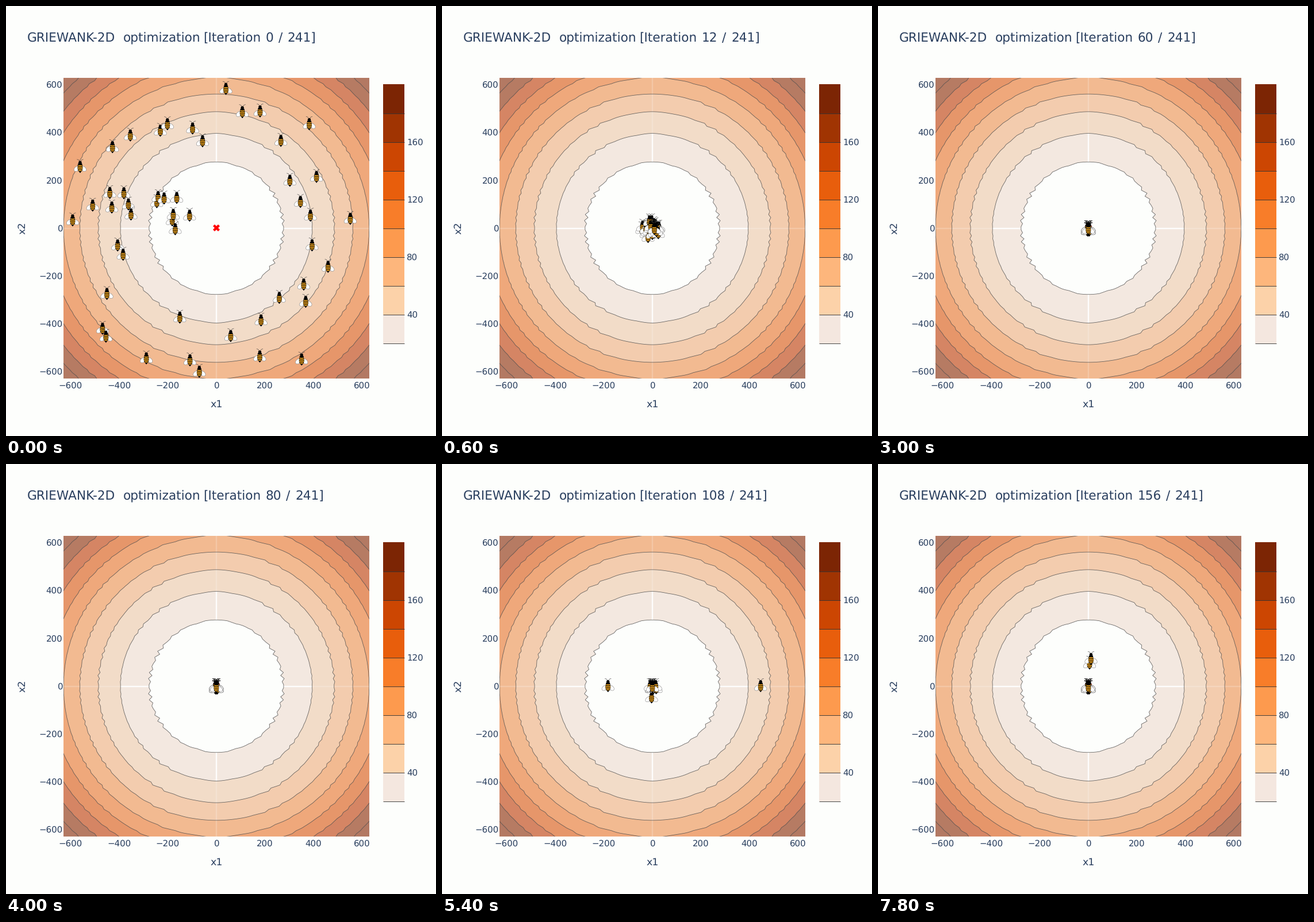
Animation of 748x748 px, one loop 8000 ms. Source, as a matplotlib script:

```python
import numpy as np
import matplotlib.pyplot as plt
from matplotlib.animation import FuncAnimation
from matplotlib.collections import LineCollection
from matplotlib.patches import Rectangle

SIZE, DPI = 748, 68
FRAMES, INTERVAL, STEP, TOTAL = 40, 200, 4, 241
CX, CY = 365.9, 386.5             # pixel position of (0, 0)
SX, SY = 0.42246, 0.41557         # pixels per data unit
LIMIT = 630
COUNT = 50
BACK, INK = "#fdfefc", "#2a3f5f"
TICK, LABEL, TITLE = 14.96, 17.45, 21.6
NUMBER_X = 451.6

BANDS = [BACK, "#f3e8e0", "#f2dcc8", "#f3ccae", "#f2ba91", "#efa87b",
         "#e6966a", "#d58564", "#b67b63", "#b37963"]
BAR = ["#f4e7df", "#fcd2a9", "#fdb67c", "#fd9a4e", "#f87d29",
       "#e85e0c", "#cc4602", "#a03402", "#7c2504"]

# Scouts jump out at a frame by (dx, dy) and glide back along their axis
SCOUTS = [(22, -208, 0), (23, 155, 0), (23, 181, 3), (24, 0, 227),
          (26, -190, 0), (27, 187, 0), (35, 0, 133),
          (38, 8, -123), (38, 2, -95)]
RETURN = 0.413

plt.rcParams["text.hinting"] = "no_hinting"
rng = np.random.default_rng(7)


def scatter():
    """Offsets at the start: a loose inner group and a wide ring."""
    inner = 12
    group = rng.normal((-75, -32), (58, 24), (inner, 2))
    ring = COUNT - inner
    angle = (np.arange(ring) + rng.uniform(-0.5, 0.5, ring)) / ring * 2 * np.pi
    radius = rng.uniform(150, 275, ring)
    wide = np.column_stack([radius * np.cos(angle), radius * np.sin(angle)])
    wide = np.clip(wide, (-250, -244), (233, 248))
    pos = np.vstack([group, wide])
    return pos[np.argsort(pos[:, 0])]


start = scatter()
drift = np.clip(rng.normal(size=(COUNT, 2)), -1.9, 1.9) * (1, 0.7)
# Neighbouring local minima of the function, half a period away
home = rng.choice([-1, 1], (COUNT, 2)) * (np.pi * SX, np.pi * 2 ** 0.5 * SY)
drift[-1] = home[-1] = 0


def swarm(i):
    """Pixel centres of all bees in frame i."""
    pull = np.interp(i, [0, 1, 2, 3, 4], [1, 0.4, 0.13, 0.015, 0])
    spread = np.interp(i, [0, 1, 2, 3, 7, 13], [0, 20, 11, 7, 3.2, 0])
    pos = (CX, CY) + start * pull + drift * spread + home * (i > 0)
    for k, (frame, dx, dy) in enumerate(SCOUTS):
        if i >= frame:
            pos[-2 - k] += np.array([dx, dy]) * RETURN ** (i - frame)
    return pos


def oval(x, y, w, h, turn=0):
    t = np.linspace(0, 2 * np.pi, 25)
    a = np.radians(turn)
    u, v = w / 2 * np.cos(t), h / 2 * np.sin(t)
    return np.column_stack([x + u * np.cos(a) - v * np.sin(a),
                            y + u * np.sin(a) + v * np.cos(a)])


def stripe(y, w):
    """A slightly sagging band across the abdomen."""
    t = np.linspace(-1, 1, 7)
    top = np.column_stack([t * w / 2, y + 0.6 * (1 - t ** 2)])
    return np.vstack([top, top[::-1] + (0, 1.7), top[:1]])


def bee_parts():
    """List of (outline, fill, edge, line width in px)."""
    feeler = np.array([(0.8, -8), (2, -9.8), (3.6, -11), (5.6, -11.4)])
    parts = [(oval(s * 5.6, 4.8, 11.5, 7.6, s * 38), "white", "#8a8a8a", 0.6)
             for s in (-1, 1)]
    parts += [(feeler * (s, 1), "none", "#333333", 0.55) for s in (-1, 1)]
    parts += [(oval(0, y, w, h), "black", "none", 0)
              for y, w, h in ((-6.2, 5.4, 5), (-2.6, 7.4, 6),
                              (3, 9, 15.4), (10.4, 2.2, 3.2))]
    parts += [(stripe(y, 8.6 - 0.14 * (y - 2) ** 2), "#f9ab1f", "none", 0)
              for y in np.arange(-1.8, 7, 2.8)]
    return parts


def points(px):
    return px * 72 / DPI


fig = plt.figure(figsize=(SIZE / DPI, SIZE / DPI), dpi=DPI, facecolor=BACK)
ax = fig.add_axes([0, 0, 1, 1])
ax.axis("off")


def text(x, y, s, px, **kw):
    return ax.text(x, y, s, fontsize=points(px), color=INK,
                   family="DejaVu Sans", va="baseline", **kw)


def draw_field():
    # The coarse grid aliases the cosines, which gives the ragged rings
    axis = np.linspace(-LIMIT, LIMIT, 100)
    x, y = np.meshgrid(axis, axis)
    z = 1 + (x ** 2 + y ** 2) / 4000 - np.cos(x) * np.cos(y / np.sqrt(2))
    px, py = CX + SX * x, CY - SY * y
    levels = np.arange(20, 201, 20)
    frame = ax.add_patch(Rectangle((100, 125), 532, 523, fc="none", lw=0))
    fills = ax.contourf(px, py, z, levels=[-5, *levels], colors=BANDS,
                        antialiased=True, zorder=1)
    lines = ax.contour(px, py, z, levels=levels, colors="#3c3c3c", alpha=0.8,
                       linewidths=points(0.8), zorder=3)
    for part in (fills, lines):
        part.set_clip_path(frame)

    def zero_line(a, b, alpha):
        style = dict(color="white", alpha=alpha, lw=points(2.4),
                     solid_capstyle="butt", zorder=2)
        ax.plot([CX + SX * a, CX + SX * b], [CY, CY], **style)
        ax.plot([CX, CX], [CY - SY * a, CY - SY * b], **style)

    for s in (-1, 1):
        zero_line(s * 278, s * 395, 0.95)
        zero_line(s * 395, s * LIMIT, 0.2)


def draw_axes():
    for v in range(-600, 601, 200):
        s = str(v).replace("-", "\u2212")
        text(CX + SX * v, 664.5, s, TICK, ha="center")
        text(98.3, CY - SY * v + 5, s, TICK, ha="right")
    text(CX, 698, "x1", LABEL, ha="center")
    text(34, CY, "x2", LABEL, ha="center", rotation=90,
         rotation_mode="anchor")


def draw_bar():
    left, width, bottom, step = 655.7, 37.4, 587.2, 50.08
    for k, color in enumerate(BAR):
        y = bottom - k * step
        ax.add_patch(Rectangle((left, y - step), width, step,
                               facecolor=color, lw=0))
        ax.plot([left, left + width], [y, y], color="#333333",
                lw=points(0.9), solid_capstyle="butt", zorder=3)
    for v in range(40, 161, 40):
        text(697.3, bottom - (v - 20) / 20 * step + 5, str(v), TICK)


draw_field()
draw_axes()
draw_bar()
for x, word in ((37, "GRIEWANK-2D"), (203.5, "optimization"),
                (343, "[Iteration")):
    text(x, 62, word, TITLE)
number = text(NUMBER_X, 62, "", TITLE)
slash = text(0, 62, "/", TITLE)
total = text(0, 62, f"{TOTAL}]", TITLE)

ax.plot([CX + 0.6], [CY - 0.4], "X", color="red", ms=points(11.5), mew=0,
        zorder=4)

PARTS = bee_parts()
bees = LineCollection([], zorder=5,
                      facecolors=[p[1] for p in PARTS] * COUNT,
                      edgecolors=[p[2] for p in PARTS] * COUNT,
                      linewidths=[points(p[3]) for p in PARTS] * COUNT)
ax.add_collection(bees, autolim=False)
ax.set_xlim(0, SIZE)
ax.set_ylim(SIZE, 0)


def update(i):
    count = str(i * STEP)
    end = NUMBER_X + 13.5 * len(count) + 7.5
    number.set_text(count)
    slash.set_x(end + 1.2)
    total.set_x(end + 17.1)
    bees.set_segments([p[0] + c for c in swarm(i) for p in PARTS])
    return number, slash, total, bees


anim = FuncAnimation(fig, update, frames=FRAMES, interval=INTERVAL,
                     repeat=True, repeat_delay=0, blit=False)
plt.show()
```
